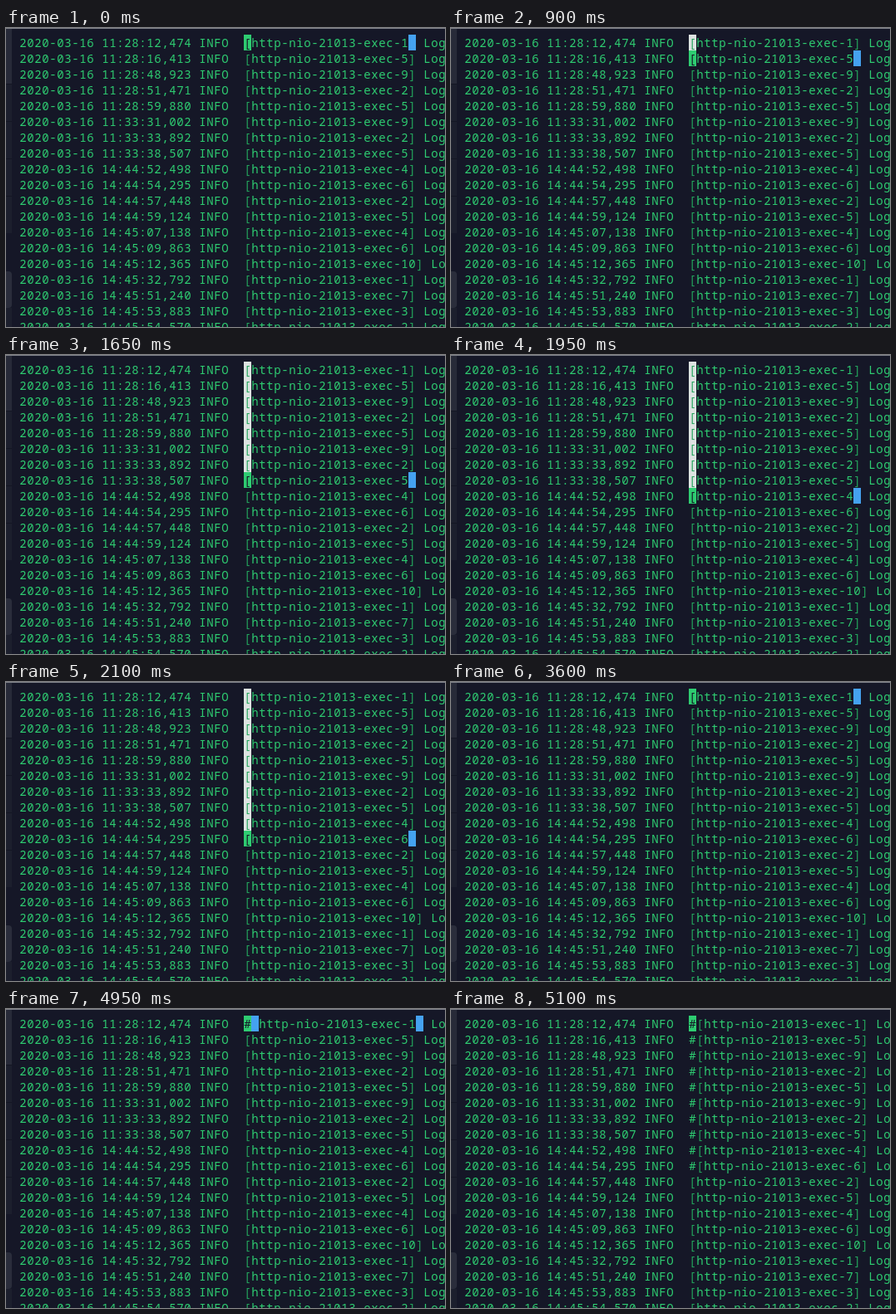
Write an HTML page with a canvas that moves like this. It is 528 px wide and 360 px high and loops after 8000 ms.

```html
<!DOCTYPE html>
<html lang="en">
<head>
<meta charset="utf-8">
<title>Block insert in a log file</title>
<style>
html, body { margin: 0; width: 100%; height: 100%; overflow: hidden; background: #151727; }
canvas { display: block; width: 528px; height: 360px; }
</style>
</head>
<body>
<canvas id="stage" width="528" height="360"></canvas>
<script>
const ctx = document.getElementById('stage').getContext('2d');
const LOOP = 8000;
const LEFT = 16, TOP = 8, CELL = 9, LINE = 19;
const BG = '#151727', GREEN = '#2ecc71', DIM = '#24a35c', BLUE = '#45a2f0', SELECT = '#dde3e1';

// Moments of the edit: down to the last row, insert, type '#', escape, apply to all rows.
const INSERT = 3600, TYPE = 4350, ESCAPE = 4950, APPLY = 5100;
const moves = [[900, 1], [1500, 3], [1650, 7], [1950, 8], [2100, 9]];
const LAST = 9;

const log = `11:28:12,474 exec-1
11:28:16,413 exec-5
11:28:48,923 exec-9
11:28:51,471 exec-2
11:28:59,880 exec-5
11:33:31,002 exec-9
11:33:33,892 exec-2
11:33:38,507 exec-5
14:44:52,498 exec-4
14:44:54,295 exec-6
14:44:57,448 exec-2
14:44:59,124 exec-5
14:45:07,138 exec-4
14:45:09,863 exec-6
14:45:12,365 exec-10
14:45:32,792 exec-1
14:45:51,240 exec-7
14:45:53,883 exec-3
14:45:54,570 exec-2`;
const lines = log.split('\n').map(entry => {
  const [time, thread] = entry.split(' ');
  return `2020-03-16 ${time} INFO  [http-nio-21013-${thread}] Log`;
});
const COL = lines[0].indexOf('[');

function rect(x, y, w, h, color) {
  ctx.fillStyle = color;
  ctx.fillRect(x, y, w, h);
}

function sidebar() {
  rect(0, 0, 7, 67, '#272a38');
  rect(0, 67, 7, 180, '#1c1f2d');
  for (let y = 67; y < 247; y += 45) rect(0, y, 7, 1, '#141623');
  ctx.fillStyle = '#2a2d3b';
  ctx.beginPath();
  ctx.roundRect(-8, 293, 15, 44, 4);
  ctx.fill();
  rect(0, 337, 7, 23, '#1c1f2d');
  rect(0, 0, 528, 1, '#7d8088');
}

function cell(row, col, char, color, bg) {
  const x = LEFT + col * CELL, y = TOP + row * LINE;
  if (bg) rect(x, y, CELL, LINE, bg);
  ctx.fillStyle = color;
  ctx.fillText(char, x + CELL / 2, y + 15);
}

function cursorRow(t) {
  if (t >= INSERT) return 0;
  return moves.reduce((row, [at, to]) => t >= at ? to : row, 0);
}

function draw(t) {
  const curRow = cursorRow(t);
  const curCol = t >= TYPE && t < ESCAPE ? COL + 1 : COL;
  const marked = t >= APPLY ? LAST + 1 : t >= TYPE ? 1 : 0;

  rect(0, 0, 528, 360, BG);
  sidebar();
  ctx.font = '14px "Noto Sans Mono", "DejaVu Sans Mono", monospace';
  ctx.textAlign = 'center';

  lines.forEach((line, row) => {
    const text = row < marked ? line.replace('[', '#[') : line;
    [...text].forEach((char, col) => {
      const bracket = char === '[' || char === ']';
      const color = bracket ? DIM : GREEN;
      if (row === curRow && col === curCol) cell(row, col, char, BG, GREEN);
      else if (row === curRow && bracket && t < APPLY) cell(row, col, char, BLUE, BLUE);
      else if (t < INSERT && row < curRow && col === COL) cell(row, col, char, color, SELECT);
      else cell(row, col, char, color);
    });
  });
}

const begin = performance.now();
function tick() {
  draw((performance.now() - begin) % LOOP);
  requestAnimationFrame(tick);
}
tick();
</script>
</body>
</html>
```
